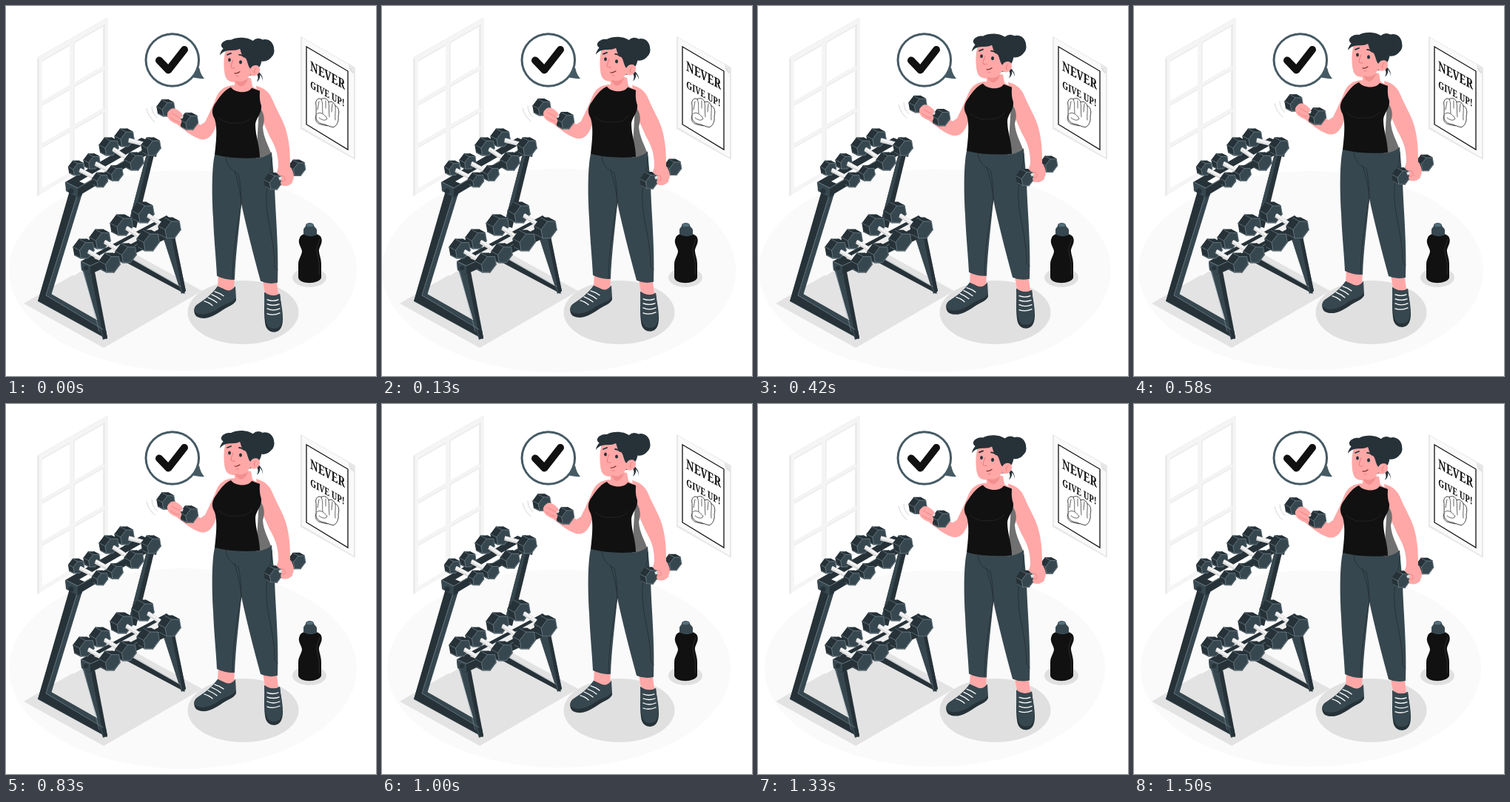
These frames come from a looping animation (500 px wide and 500 px high, 1.54 s). An HTML page with a canvas:

```html
<!DOCTYPE html>
<html lang="en">
<head>
<meta charset="utf-8">
<title>Workout</title>
<style>
html, body { margin: 0; width: 100%; height: 100%; overflow: hidden; background: #fff; }
canvas { display: block; width: 100vw; height: 100vh; }
</style>
</head>
<body>
<canvas id="stage" width="500" height="500"></canvas>
<script>
const ctx = document.getElementById('stage').getContext('2d');
const LOOP = 1540;
const SKIN = '#ffa8a7', SLATE = '#37474f', DARK = '#263238', INK = '#111', SHADE = '#e3e3e3';
const EDGE = '#90a4ae';

function fill(color, d) {
  ctx.fillStyle = color;
  ctx.fill(new Path2D(d));
}

function line(color, width, d, cap = 'round') {
  ctx.strokeStyle = color;
  ctx.lineWidth = width;
  ctx.lineCap = cap;
  ctx.lineJoin = cap === 'round' ? 'round' : 'miter';
  ctx.stroke(new Path2D(d));
}

function oval(color, x, y, rx, ry = rx, turn = 0) {
  ctx.fillStyle = color;
  ctx.beginPath();
  ctx.ellipse(x, y, rx, ry, turn, 0, Math.PI * 2);
  ctx.fill();
}

// Hexagonal weight whose axis runs down to the right.
function weight(x, y, r) {
  const hex = (cx, cy) => Array.from({ length: 6 }, (_, i) => {
    const a = i * Math.PI / 3 + 0.35;
    return [cx + Math.cos(a) * r * 0.74, cy + Math.sin(a) * r * 0.82 - Math.cos(a) * r * 0.3];
  });
  const path = pts => 'M' + pts.map(p => p.map(v => v.toFixed(2))).join('L') + 'Z';
  const back = hex(x - r * 0.3, y - r * 0.16);
  const front = hex(x + r * 0.3, y + r * 0.16);
  for (let i = 0; i < 6; i++) {
    const j = (i + 1) % 6;
    const side = path([back[i], back[j], front[j], front[i]]);
    fill(DARK, side);
    line(DARK, 1.4, side);
  }
  fill(DARK, path(back));
  for (const i of [2, 3, 4]) line(EDGE, 0.5, `M${back[i]}L${front[i]}`);
  fill(SLATE, path(front));
  line(EDGE, 0.55, path(front));
}

function handle(x, y, dx, dy) {
  line('#dcdcdc', 6, `M${x} ${y}l${dx} ${dy}`, 'butt');
  line('#f3f3f3', 3, `M${x} ${y - 1}l${dx} ${dy}`, 'butt');
}

// Each entry: rear weight, front weight and radius.
function dumbbells(list) {
  for (const [x, y, fx, fy, r] of list) {
    weight(x, y, r);
    handle(x + r * 0.45, y + r * 0.25, fx - x - r, fy - y - r * 0.45);
    weight(fx, fy, r);
  }
}

function drawWindow() {
  fill('#f5f5f5', 'M42 70L137 16V201L42 257Z');
  fill('#fff', 'M49 73L131 26V199L49 246Z');
  fill('#ebebeb', 'M42 70L45 72V256L42 257Z M131 26L134 24V198L131 200Z M49 73L131 26V28L49 75Z');
  line('#f4f4f4', 6, 'M89 48V223M48 132L133 83M48 189L133 140', 'butt');
  line('#e9e9e9', 1, 'M92 49V102M92 109V160M92 167V221M49 134L86 113M92 109L131 87M49 191L86 170M92 166L131 144', 'butt');
  line('#ededed', 0.8, 'M42 70L137 16V201');
}

function drawPoster() {
  fill('#e8e8e8', 'M398 41L472 83V208L398 166Z');
  fill('#fafafa', 'M400 43L463 79Q464 87 470 91V205L400 164Z');
  fill('#dedede', 'M463 79L471 92Q464 90 463 79Z');
  fill('#fff', 'M406 55L462 88V194L406 160Z');
  line(INK, 1.3, 'M406 55L462 88V194L406 160Z', 'butt');
  ctx.fillStyle = INK;
  ctx.textAlign = 'center';
  const word = (text, size, y) => {
    ctx.save();
    ctx.transform(0.75, 0.42, 0, 1, 434.5, y);
    ctx.font = `bold ${size}px "Noto Serif", serif`;
    ctx.fillText(text, 0, 0);
    ctx.restore();
  };
  word('NEVER', 18, 100);
  word('GIVE UP!', 13.6, 123.5);
  line(INK, 0.8, 'M419 134C417 128 422 123 426 126C430 123 435 126 436 130C440 128 444 131 445 135C449 136 451 142 449 149C450 156 447 162 442 164L430 160C423 159 418 155 419 148Z');
  line(INK, 0.65, 'M426 126C429 132 427 138 428 145M436 130C437 137 436 143 437 150M445 135C446 141 444 147 445 154M420 146C424 142 430 146 434 152C432 156 426 154 423 151M419 148C416 153 420 159 425 160L434 162M423 129L421 140M432 128L432 138M441 132L440 143');
}

function drawBubble() {
  fill('#455a64', 'M261 83Q263 93 268 98Q258 99 248 95Z');
  oval('#455a64', 224.8, 73, 37.3, 36.8);
  oval('#fff', 224.8, 73, 34.3, 33.8);
  line(INK, 10, 'M207 73.5L219.5 86.5L241 59');
}

function drawRack() {
  fill(SHADE, 'M24 402L156 325L265 385L132 462Z');
  // rear frame
  fill(DARK, 'M191 196L203 189L176 300L165 296Z');
  fill(SLATE, 'M191 196L195 198L170 297L165 296Z');
  fill(DARK, 'M163 338L240 382L242 389L163 347Z');
  fill(SLATE, 'M212 312L226 306L243 385L237 389Z');
  fill(DARK, 'M223 309L227 306L243 385L239 389Z');
  line(EDGE, 0.5, 'M165 338L236 379');
  // front frame
  fill(SLATE, 'M88 247L99 252L57 390L133 437L136 450L43 399Z');
  fill('#fff', 'M104 257L61 390L121 421L104 351Z');
  fill(SHADE, 'M65 378L61 390L122 423L118 408L85 389L91 363Z');
  fill('#fafafa', 'M104 257L65 378L110 352L104 351Z');
  fill(SHADE, 'M63 381L109 354L121 423L61 391Z');
  fill(DARK, 'M87 246L97 252L53 396L43 399Z');
  fill(SLATE, 'M97 252L105 247L61 391L53 396Z');
  fill(DARK, 'M43 398L54 391L135 438L137 450Z');
  fill(SLATE, 'M54 391L61 389L126 426L128 434Z');
  fill(SLATE, 'M102 352L114 357L137 449L131 451Z');
  fill(DARK, 'M114 357L119 354L137 448L132 450Z');
  line(EDGE, 0.55, 'M97 253L54 391L131 437M104 355L126 440');
  // upper rails
  fill(DARK, 'M80 238L183 178L198 184L201 195L101 255L82 250Z');
  fill('#fff', 'M99 237L186 187L192 190L106 240Z');
  fill(SLATE, 'M80 238L97 245V259L81 250Z');
  fill(DARK, 'M97 245L103 241V255L97 259Z');
  line(EDGE, 0.6, 'M81 238L97 246L198 187');
  oval(DARK, 88, 250, 3.5);
  fill(DARK, 'M185 184L193 177L206 184L203 204L187 200Z');
  dumbbells([
    [160, 178, 196, 190, 13],
    [139, 190, 173, 210, 13],
    [116, 210, 147, 226, 11],
    [95, 219, 127, 235, 10.5]
  ]);
  // lower rails
  fill(DARK, 'M101 345L217 283L234 297L231 308L113 363L102 356Z');
  fill('#eee', 'M119 341L209 292L217 296L127 344Z');
  fill(SLATE, 'M101 345L114 351V363L102 357Z');
  line(EDGE, 0.6, 'M101 345L114 351L229 299');
  oval(DARK, 108, 354, 3);
  dumbbells([
    [185, 279, 221, 300, 15],
    [156, 296, 192, 317, 15],
    [127, 315, 162, 334, 14],
    [105, 328, 140, 347, 14]
  ]);
}

function drawBottle() {
  oval('#e0e0e0', 410, 367, 23, 13);
  fill(INK, 'M397 313C399 305 423 305 426 313C429 321 422 326 423 332C424 338 426 342 426 349V367C424 376 397 377 395 367V349C395 342 399 338 400 332C400 326 393 321 397 313Z');
  fill(SLATE, 'M402 302C403 299 405 299 405 296C406 292 415 292 416 296C416 299 420 300 420 303L420 309C416 312 406 312 402 308Z');
  oval('#546e7a', 410.5, 296, 5, 2.3);
  line('#333', 0.8, 'M424 315C423 321 419 325 420 332L423 346V363');
}

function drawLegs() {
  fill(SKIN, 'M287 362L309 367L308 384Q297 386 286 380Z M347 371L366 374L368 390Q358 395 350 388Z');
  fill(DARK, 'M286 379C279 389 269 397 258 404C252 409 254 417 258 420C270 426 282 418 290 413C299 406 308 405 311 398L310 379Q304 387 297 384Z');
  fill(SLATE, 'M286 379C279 389 269 397 258 404C253 408 254 413 257 415C267 420 280 414 288 408C297 402 307 401 310 395L310 379Q304 387 297 384Z');
  fill(DARK, 'M349 387C350 400 348 411 350 428C351 438 357 441 363 441C371 440 374 433 374 423C374 410 371 400 370 389Q360 395 349 387Z');
  fill(SLATE, 'M349 387C350 400 349 411 351 424C352 433 357 437 363 436C370 436 373 430 373 421C373 410 371 400 370 389Q360 395 349 387Z');
  line('#fff', 1.3, 'M282 386Q289 388 294 392M278 390Q285 393 290 397M273 394Q280 397 285 401M268 399Q275 401 279 405M353 397Q361 400 368 397M353 403Q361 406 369 403M353 409Q361 413 370 409M353 416Q361 419 370 415');
  fill(SLATE, 'M282 201C278 220 278 255 280 287C281 316 284 342 285 365Q297 371 309 370C310 338 315 301 318 267C325 300 335 339 344 372Q355 377 367 374C369 330 364 280 363 243L359 198Z');
  line(DARK, 1, 'M297 204C298 217 305 222 314 227Q318 245 318 267M318 267C312 302 307 327 306 369M318 267C316 244 311 231 309 223M359 205C360 225 350 238 352 268C353 293 363 318 363 353L367 357');
}

function drawArms() {
  fill(SKIN, 'M307 107C294 109 288 114 284 124C280 134 274 147 269 157L263 161L240 150C235 143 231 140 226 140C222 136 217 139 218 146C218 154 224 157 231 160C240 167 250 176 262 180C274 183 280 173 284 162L300 139Z');
  fill(SKIN, 'M338 108C352 112 357 119 361 129C367 144 376 156 380 174C384 191 384 207 384 218C389 224 391 232 386 239C380 246 370 244 367 238C364 231 367 225 368 217C368 199 363 188 356 176L344 149Z');
}

function drawTorso() {
  fill(SKIN, 'M309 94L331 98L333 109L344 116L320 134L300 111L309 107Z');
  fill('#707070', 'M342 137C350 145 350 155 347 164C348 179 355 189 358 199Q350 205 338 206Z');
  fill(INK, 'M304 110C297 113 292 118 284 130C277 139 278 146 282 153C286 165 284 184 282 201Q310 208 343 205C343 189 337 176 337 161C337 152 346 146 345 135C342 126 343 119 343 115L332 111C327 119 309 118 304 110Z');
  line('#252525', 0.9, 'M287 151Q300 161 311 158M311 158Q324 160 333 150');
}

function drawHead() {
  fill(DARK, 'M333 84C341 93 342 97 339 103C342 101 344 96 343 93Q347 97 347 103Q348 94 340 88Z');
  oval(DARK, 349, 60, 13, 15, 0.3);
  oval(DARK, 341, 54, 10);
  oval(DARK, 355, 61, 7.5, 9);
  fill(DARK, 'M293 57C287 52 295 45 304 46C313 41 329 42 336 49C347 57 348 73 343 82L333 94H322Z');
  fill(SKIN, 'M298 57C294 67 294 78 295 88C296 98 299 102 307 103C319 105 326 99 330 93C337 98 344 91 343 85C342 79 335 79 331 83C327 78 329 72 324 66C318 62 319 58 317 55C310 60 303 59 298 57Z');
  fill(DARK, 'M289 67C290 59 297 53 305 53L321 53C330 61 336 70 334 80L330 85C326 80 327 74 323 70C317 66 318 62 316 58C308 63 297 56 289 67Z');
  line(DARK, 1.8, 'M299 66L304 64M315 66Q319 66 322 69');
  oval(DARK, 302, 73, 1.9, 2.5);
  oval(DARK, 317, 76, 2, 2.6);
  line('#e87878', 1, 'M307 73Q304 80 304 83Q306 85 309 84');
  line('#7d302f', 1.2, 'M309 91Q312 92 316 89');
  line('#e87878', 0.9, 'M338 84Q334 87 336 91M311 95L314 95');
  fill('#f28f8f', 'M310 101Q319 105 327 98Q325 107 318 109Q312 108 310 101Z');
}

function drawWoman() {
  drawLegs();
  weight(393, 219, 11.5);
  drawArms();
  drawTorso();
  drawHead();
  weight(361, 237, 12);
  line('#e0e0e0', 4, 'M369 234L373 232M383 225L386 223', 'butt');
  fill(SKIN, 'M370 218C364 224 365 229 373 230L371 240Q378 247 387 239V226Q387 220 383 217Z');
  line('#e87878', 0.7, 'M372 230Q377 229 377 234M372 237Q376 238 378 235');
  weight(216, 138, 12);
  weight(247.5, 156, 12);
  line('#e0e0e0', 4, 'M224 142L229 145M235 149L239 151', 'butt');
  fill(SKIN, 'M221 141C226 136 231 139 238 146Q239 150 235 151Q239 156 236 160Q225 159 219 151Q216 145 221 141Z');
  line('#e87878', 0.7, 'M224 145Q230 149 235 151M222 151Q228 156 234 157');
  line('#bdbdbd', 0.65, 'M190 139Q192 149 201 157M197 136Q197 145 204 151');
}

// Half-width of the floor, as [time, size] pairs.
const floorKeys = [[0, 235], [250, 243], [580, 233], [830, 235], [1130, 230], [1500, 230], [LOOP, 235]];

function floorSize(t) {
  const i = floorKeys.findIndex(key => key[0] > t);
  const [t0, a] = floorKeys[i - 1], [t1, b] = floorKeys[i];
  return a + (b - a) * (t - t0) / (t1 - t0);
}

function draw(now) {
  const t = now % LOOP;
  const lift = 3.75 * (1 - Math.cos((t + 70) / LOOP * Math.PI * 2));
  const floor = floorSize(t);
  ctx.fillStyle = '#fff';
  ctx.fillRect(0, 0, 500, 500);
  oval('#fafafa', 239, 357.5, floor, floor * 0.577);
  drawWindow();
  drawPoster();
  drawRack();
  drawBottle();
  oval('#e0e0e0', 320.5, 414, 75, 43);
  drawBubble();
  ctx.save();
  ctx.translate(0, -lift);
  drawWoman();
  ctx.restore();
  requestAnimationFrame(draw);
}
requestAnimationFrame(draw);
</script>
</body>
</html>
```
